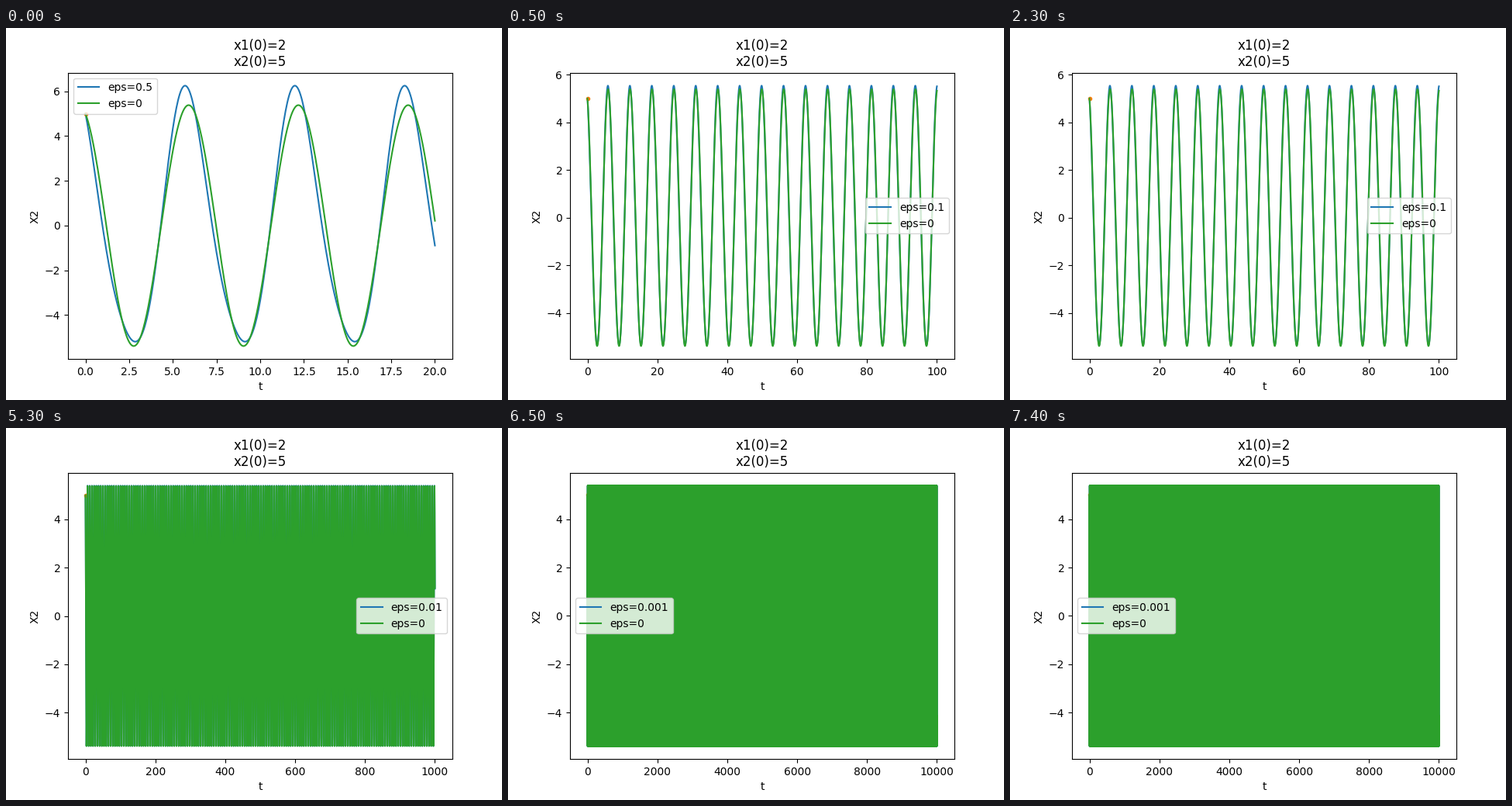
Write a matplotlib script that moves like this. It is 640x480 px and loops after 8 s.

```python
import numpy as np
import matplotlib.pyplot as plt
from matplotlib.animation import FuncAnimation

X1, X2 = 2, 5
STEP = 0.05
FRAME_MS = 500

# eps, time span, legend place, number of frames on screen
SCENES = [
    (0.5, 20, "upper left", 1),
    (0.1, 100, "center right", 6),
    (0.01, 1000, "center right", 6),
    (0.001, 10000, "center left", 3),
]
ORDER = [i for i, scene in enumerate(SCENES) for _ in range(scene[3])]


def solve(t, eps):
    """x2 of x1' = x2, x2' = -x1 - 4 eps cos(t)^2."""
    free = X2 * np.cos(t) - X1 * np.sin(t)
    return free - 4 / 3 * eps * (np.sin(t) + np.sin(2 * t))


def make_axes(fig, eps, span, place):
    ax = fig.add_subplot(label=str(eps))
    t = np.linspace(0, span, int(span / STEP) + 1)
    ax.plot(t, solve(t, eps), label=f"eps={eps}")
    ax.plot(0, X2, ".")
    ax.plot(t, solve(t, 0), label="eps=0")
    ax.set_title(f"x1(0)={X1}\nx2(0)={X2}")
    ax.set_xlabel("t")
    ax.set_ylabel("X2")
    ax.legend(loc=place)
    return ax


fig = plt.figure(figsize=(6.4, 4.8), dpi=100)
plots = [make_axes(fig, *scene[:3]) for scene in SCENES]


def update(i):
    for k, ax in enumerate(plots):
        ax.set_visible(k == ORDER[i])
    return plots


anim = FuncAnimation(fig, update, frames=len(ORDER), interval=FRAME_MS,
                     repeat=True, repeat_delay=0, blit=False)
plt.show()
```
